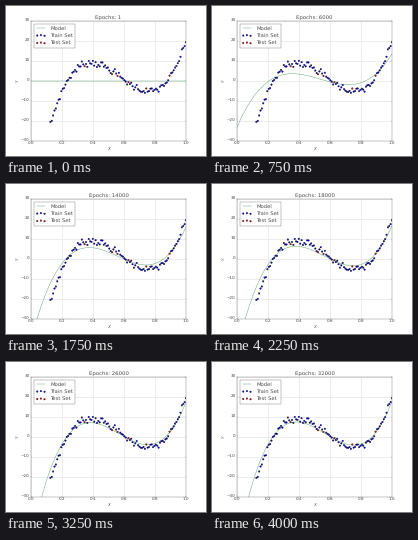
A matplotlib script for the animation above (7 s loop, 200 by 150 pixels).

```python
import numpy as np
import matplotlib.pyplot as plt
from matplotlib.animation import FuncAnimation

STEP_MS, FRAMES, LAST = 250, 28, 16
EPOCHS_PER_STEP = 2000
DECAY = 0.853  # what is left of the slow error after each step

INK, EDGE = "0.3", "0.35"
plt.style.use("classic")
plt.rcParams.update({
    "font.family": "DejaVu Sans",
    "text.hinting": "none",
    "text.color": INK,
    "axes.labelcolor": INK,
    "xtick.color": INK,
    "ytick.color": INK,
    "axes.edgecolor": EDGE,
    "axes.axisbelow": True,
})


def best_fit(x, top=0.385, low=0.757, lead=1460, peak=8.1):
    """Cubic with its maximum at top and its minimum at low."""
    u = x - top
    return peak + lead * (u**3 / 3 - (low - top) * u**2 / 2)


# the slowly vanishing error is a cubic through four points
slow_error = np.poly1d(np.polyfit([0, 0.4, 0.77, 1], [-59.3, 7.4, -4.7, 8], 3))

grid_x = np.linspace(0, 1, 200)


def model(step):
    if step == 0:
        return np.zeros_like(grid_x)
    return best_fit(grid_x) - DECAY**step * slow_error(grid_x)


# samples lie a little beyond what the model reaches
rng = np.random.RandomState(7)
xs = np.linspace(0.125, 1, 100)
ys = best_fit(xs) + 0.15 * slow_error(xs) + rng.normal(0, 0.85, xs.size)
test = np.zeros(xs.size, bool)
for x in (0.35, 0.52, 0.555, 0.63, 0.74, 0.895):
    test[np.abs(xs - x).argmin()] = True

fig = plt.figure(figsize=(8, 6), dpi=25, facecolor="white")
ax = fig.add_axes([0.125, 0.1, 0.775, 0.8])
ax.set_xlim(0, 1)
ax.set_ylim(-30, 30)
ax.set_xticks(np.linspace(0, 1, 6))
ax.set_yticks(range(-30, 31, 10))
ax.grid(True, color="0.92", linestyle="-", linewidth=2.6)
ax.set_xlabel("X", style="italic", labelpad=3)
ax.set_ylabel("Y", style="italic")
title = ax.set_title("", size=15.6)

curve, = ax.plot([], [], color="#3a9556", lw=1.1, zorder=2,
                 snap=False, label="Model")


def dots(mask, color, z, label):
    # two widths keep the dots at sub-pixel places
    ax.scatter(xs[mask], ys[mask], s=20, c=color, edgecolors="black",
               linewidths=[1, 1], zorder=z, label=label)


dots(~test, "blue", 3, "Train Set")
dots(test, "red", 4, "Test Set")
legend = ax.legend(loc="upper left", scatterpoints=3, fontsize=15)
legend.get_frame().set_edgecolor(EDGE)
legend.set_zorder(6)


def draw(i):
    step = min(i, LAST)
    curve.set_data(grid_x, model(step))
    title.set_text(f"Epochs: {max(1, step * EPOCHS_PER_STEP)}")
    return curve, title


anim = FuncAnimation(fig, draw, frames=FRAMES, interval=STEP_MS,
                     init_func=lambda: draw(0), repeat=True, repeat_delay=0)
plt.show()
```
